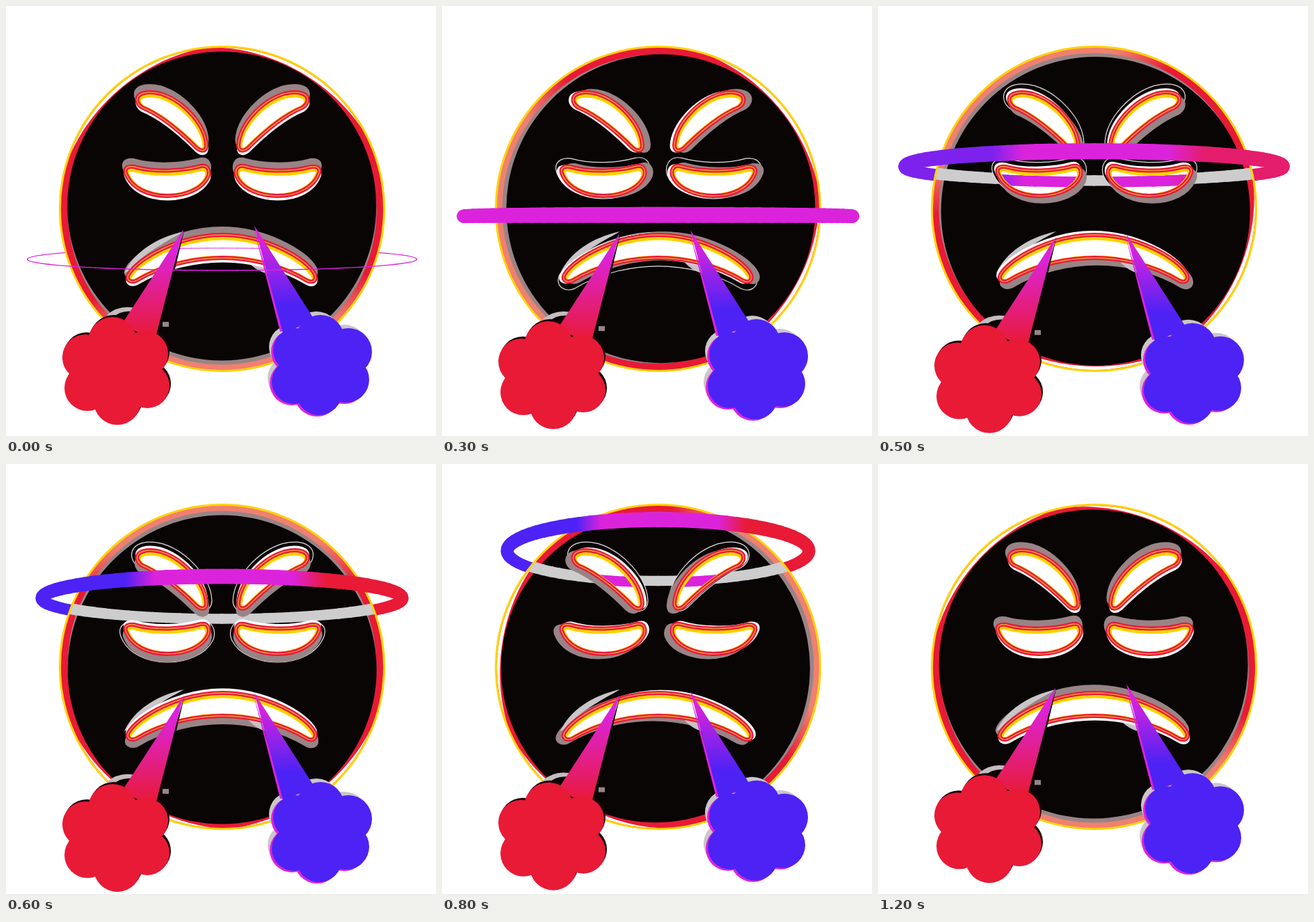
An HTML page for the animation above (1250 ms loop, 618 px wide and 618 px high).

```html
<!DOCTYPE html>
<html lang="en">
<head>
<meta charset="utf-8">
<title>Fuming face with rising ring</title>
<style>
  html, body { margin: 0; width: 100%; height: 100%; overflow: hidden; background: #fff; }
  svg { display: block; width: 100vw; height: 100vh; }
</style>
</head>
<body>
<svg viewBox="0 0 618 618">
  <defs>
    <linearGradient id="rimFill" gradientUnits="userSpaceOnUse" x1="77" y1="291" x2="545" y2="291">
      <stop offset=".74" stop-color="#e81a36"/><stop offset=".87" stop-color="#f08070"/>
    </linearGradient>
    <linearGradient id="ringFill" gradientUnits="userSpaceOnUse" x1="0" y1="0" x2="618" y2="0">
      <stop offset=".24"/><stop offset=".32" stop-color="#dc23dc"/>
      <stop offset=".69" stop-color="#dc23dc"/><stop offset=".78"/>
    </linearGradient>
    <linearGradient id="redTrail" gradientUnits="userSpaceOnUse" x1="0" y1="350" x2="0" y2="475">
      <stop offset="0" stop-color="#dc23dc"/><stop offset="1" stop-color="#e81a36"/>
    </linearGradient>
    <linearGradient id="blueTrail" gradientUnits="userSpaceOnUse" x1="0" y1="335" x2="0" y2="430">
      <stop offset="0" stop-color="#dc23dc"/><stop offset="1" stop-color="#4d22f5"/>
    </linearGradient>
    <clipPath id="disc"><circle cx="310.5" cy="291.5" r="233"/></clipPath>
    <clipPath id="holes"></clipPath>
    <g id="back"></g>
    <g id="front"></g>
    <g id="leftPuff"></g>
    <g id="rightPuff"></g>
  </defs>

  <rect width="618" height="618" fill="#fff"/>
  <use href="#back" stroke="url(#ringFill)"/>

  <circle cx="310.5" cy="291.5" r="233" fill="url(#rimFill)"/>
  <circle id="side" cx="310.5" cy="291.5" r="222" fill="#988486"/>
  <circle id="face" cx="310.5" cy="291.5" r="222" fill="#090504"/>
  <path id="glint" fill="#fff"/>
  <g clip-path="url(#disc)"><use id="shine" href="#back" y="-2" stroke="#cdcdcd"/></g>
  <circle cx="310.5" cy="291.5" r="233" fill="none" stroke="#ffd200" stroke-width="3"/>

  <g id="halos" stroke-linejoin="round"></g>
  <g id="walls" fill="#988486" stroke="#988486" stroke-width="8" stroke-linejoin="round"></g>
  <path d="M170 384C184 354 215 333 256 324C226 341 194 358 178 380Z" fill="#c8c6c8"/>
  <path d="M345 364L371 371L377 385Q358 381 345 364Z" fill="#c9c0c8"/>
  <g id="edges" fill="none" stroke="#fff" stroke-width="5" stroke-linejoin="round"></g>
  <g clip-path="url(#holes)">
    <rect x="150" y="100" width="320" height="310" fill="#fff"/>
    <use href="#back" stroke="url(#ringFill)"/>
    <g id="gold" transform="translate(0 2)" fill="none" stroke="#ffd200" stroke-width="11"></g>
  </g>
  <g id="outlines" fill="none" stroke="#e81a36" stroke-width="6" stroke-linejoin="round"></g>
  <g id="hairlines" fill="none" stroke="#f6964a" stroke-width="1.4"></g>

  <g id="steam">
    <ellipse cx="173" cy="455" rx="22" ry="18" fill="#090504"/>
    <path d="M145 444Q164 428 189 435L187 440Q166 435 152 449Z" fill="#c4bcc0"/>
    <rect x="225" y="454" width="9" height="7" fill="#988486"/>
    <path d="M257 319L220 474L210 474Z" fill="#090504"/>
    <use href="#leftPuff" x="2" y="-3" fill="#1c0508"/>
    <path d="M255 321L166 458L214 480Z" fill="url(#redTrail)"/>
    <use href="#leftPuff" fill="#e81a36"/>
    <use href="#rightPuff" x="-6" y="-5" fill="#cac6ca"/>
    <use href="#rightPuff" x="-3" y="2" fill="#dc23dc"/>
    <path d="M355 316L394 468L400 468Z" fill="#dc23dc"/>
    <path d="M357 316L398 470L444 452Z" fill="url(#blueTrail)"/>
    <use href="#rightPuff" fill="#4d22f5"/>
  </g>

  <use href="#front" stroke="url(#ringFill)"/>
</svg>
<script>
const LOOP = 1250, STEP = 50, SEGS = 40;
const $ = id => document.getElementById(id);

function add(parent, tag, attrs) {
  const el = document.createElementNS('http://www.w3.org/2000/svg', tag);
  set(el, attrs);
  return parent.appendChild(el);
}
function set(el, attrs) {
  for (const k in attrs) el.setAttribute(k, attrs[k]);
}

// Cut-outs of the face: outline, middle height, mirrored twin
const brow = 'M189 138C185 124 205 122 222 126C255 136 286 170 288 200C288 210 280 209 274 204C255 185 225 158 196 146C191 143 190 141 189 138Z';
const eye = 'M172 240C170 232 176 230 184 231C215 240 255 237 280 230C290 228 293 236 291 244C283 264 255 273 232 273C205 273 180 262 172 240Z';
const mouth = 'M176 386C190 362 250 329 311 329C372 329 432 362 444 386C447 396 440 398 433 395C395 372 350 362 311 362C272 362 225 372 187 395C179 398 172 394 176 386Z';
const flip = 'matrix(-1 0 0 1 622 0)';
const cuts = [[brow, 165, ''], [brow, 165, flip], [eye, 250, ''], [eye, 250, flip], [mouth, 360, '']];

const halos = cuts.map(([d, y, transform]) => {
  const g = add($('halos'), 'g', {});
  add(g, 'path', { d, transform, fill: 'none', stroke: '#e4dcde', 'stroke-width': 17 });
  add(g, 'path', { d, transform, fill: '#090504', stroke: '#090504', 'stroke-width': 14.6 });
  return { g, y };
});
for (const [d, , transform] of cuts)
  for (const id of ['holes', 'walls', 'edges', 'gold', 'outlines', 'hairlines'])
    add($(id), 'path', { d, transform });

function puff(id, lobes) {
  for (const [cx, cy, r] of lobes) add($(id), 'circle', { cx, cy, r });
}
puff('leftPuff', [[153, 482, 35], [114, 505, 33], [200, 500, 33], [203, 546, 32], [160, 568, 34], [117, 549, 33], [158, 525, 45]]);
puff('rightPuff', [[452, 478, 34], [492, 497, 34], [489, 537, 33], [450, 555, 33], [414, 540, 32], [416, 495, 32], [452, 515, 45]]);

const segs = Array.from({ length: SEGS * 2 }, (_, i) =>
  add($(i < SEGS ? 'front' : 'back'), 'line', { 'stroke-linecap': 'round' }));
const stops = $('ringFill').children;

// Keys every 200 ms
const ring = {
  cy: [364, 331, 268, 193, 125, 73, 50],
  rx: [280, 278, 279, 259, 217, 178, 155],
  ry: [16, 7, -12, -31.5, -45, -45, -41],
  w: [1.2, 16, 20, 18, 18, 10, 0]
};
const lightDir = [85, 142, 208, 268, 335, 392, 438, 490];

function spline(keys, t) {
  const p = t / 200, i = Math.floor(p), u = p - i;
  const at = k => keys[Math.max(0, Math.min(keys.length - 1, k))];
  const [a, b, c, d] = [at(i - 1), at(i), at(i + 1), at(i + 2)];
  return b + u / 2 * (c - a + u * (2 * a - 5 * b + 4 * c - d + u * (3 * (b - c) + d - a)));
}
function mix(from, to, u) {
  return `rgb(${from.map((v, i) => Math.round(v + (to[i] - v) * u))})`;
}

function drawRing(t) {
  const cx = 310.5, [cy, rx, ry, w] = ['cy', 'rx', 'ry', 'w'].map(k => spline(ring[k], t));
  const shown = t < 1200 && w > 0.3;
  segs.forEach((el, i) => {
    const a = i * Math.PI / SEGS, b = a + Math.PI / SEGS;
    const width = w * (1 + 0.2 * Math.sin((a + b) / 2));
    set(el, {
      x1: cx + rx * Math.cos(a), y1: cy + ry * Math.sin(a),
      x2: cx + rx * Math.cos(b), y2: cy + ry * Math.sin(b),
      'stroke-width': shown ? width : 0
    });
  });
  set($('ringFill'), { x1: cx - rx - w / 2, x2: cx + rx + w / 2 });
  const tint = Math.max(0, Math.min(1, (t - 400) / 150)), pink = [220, 35, 220];
  set(stops[0], { 'stop-color': mix(pink, [77, 34, 245], tint) });
  set(stops[3], { 'stop-color': mix(pink, [232, 26, 54], tint) });
  const lit = shown && w > 3;
  set($('shine'), { opacity: lit ? 1 : 0 });

  // Cut-outs near the far side of the ring get a thin edge facing away from it
  for (const { g, y } of halos) {
    const gap = y - (cy - ry), near = lit && gap < 60 && gap > -118;
    set(g, { opacity: near ? 1 : 0, transform: `translate(0 ${gap > 0 ? 4 : -4})` });
  }
}

function crescent(from, to) {
  const n = 20, outer = [], inner = [];
  for (let i = 0; i <= n; i++) {
    const a = (from + (to - from) * i / n) * Math.PI / 180;
    const r = 231.5 - 5 * Math.sin(Math.PI * i / n);
    const point = q => `${310.5 + q * Math.cos(a)} ${291.5 + q * Math.sin(a)}`;
    outer.push(point(231.5));
    inner.unshift(point(r));
  }
  return `M${outer.concat(inner).join('L')}Z`;
}

function drawLight(t) {
  const deg = spline(lightDir, t), a = deg * Math.PI / 180;
  const shift = k => ({ transform: `translate(${k * Math.cos(a)} ${k * Math.sin(a)})` });
  set($('rimFill'), { gradientTransform: `rotate(${deg} 310.5 291.5)` });
  set($('side'), shift(2));
  set($('face'), shift(-4));
  set($('walls'), shift(-8));
  set($('edges'), shift(4));
  const far = deg + 180;
  set($('glint'), { d: crescent(far - 65, far - 5) + crescent(far + 5, far + 65) });
}

function draw(ms) {
  const t = Math.floor(ms % LOOP / STEP) * STEP;
  drawRing(t);
  drawLight(t);
  const bob = 6.5 * (1 - Math.cos(2 * Math.PI * t / LOOP));
  set($('steam'), { transform: `translate(0 ${bob})` });
}

const start = performance.now();
function tick() {
  draw(Math.max(0, performance.now() - start));
  requestAnimationFrame(tick);
}
tick();
</script>
</body>
</html>
```
